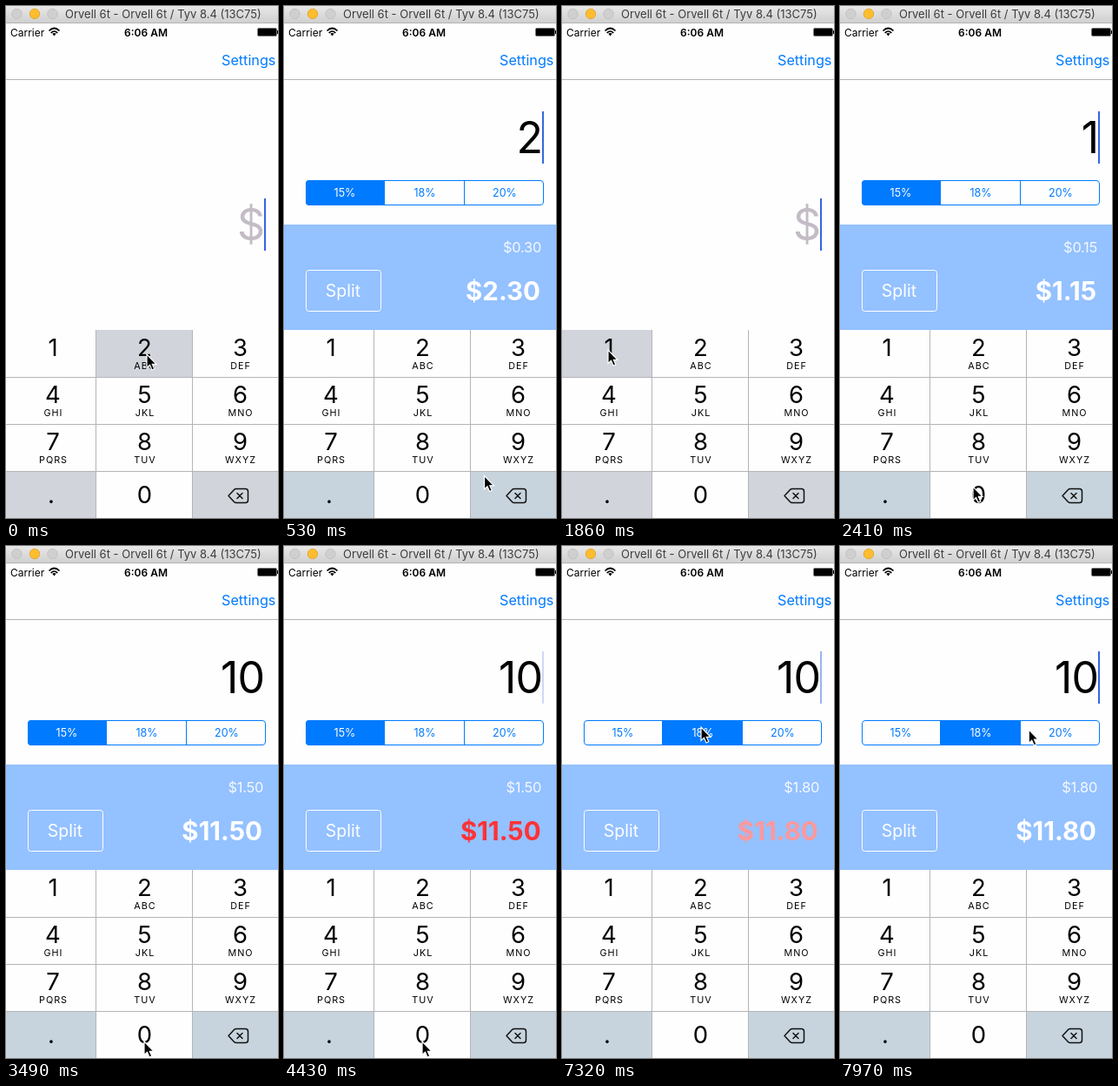
Animation of 313 by 588 pixels, one loop 8000 ms. Source, as an HTML page:

```html
<!DOCTYPE html>
<html lang="en">
<head>
<meta charset="utf-8">
<title>Tip calculator</title>
<style>
  html, body { margin: 0; width: 100%; height: 100%; overflow: hidden; background: #fff; }
  svg { display: block; width: 313px; height: 588px; font-family: Inter, Roboto, sans-serif; }
  .mid { text-anchor: middle; }
  .end { text-anchor: end; }
  .blue { fill: #007aff; }
  .line { stroke: #b4b5b8; }
  .digit { font-size: 27.5px; }
  .letters { font-size: 10.8px; letter-spacing: 1px; }
  .outline { fill: none; stroke: #007aff; }
</style>
</head>
<body>
<svg viewBox="0 0 313 588">
  <defs>
    <linearGradient id="chrome" x2="0" y2="1">
      <stop stop-color="#e9e8e9"/><stop offset="1" stop-color="#d1d0d1"/>
    </linearGradient>
    <clipPath id="segmentClip"><rect x="25" y="200" width="274" height="29" rx="4"/></clipPath>
  </defs>
  <rect width="313" height="588" fill="#fefefe"/>

  <g id="sheet">
    <g clip-path="url(#segmentClip)"><rect id="selected" y="200" height="29" class="blue"/></g>
    <rect x="25.5" y="200.5" width="273" height="28" rx="3.5" class="outline"/>
    <path d="M115.5 200V229M207.5 200V229" class="outline"/>
    <g id="segments" class="mid" font-size="12.5"></g>
    <rect y="251" width="313" height="337" fill="#94c1ff"/>
    <text id="tip" x="296" y="283" class="end" font-size="16.5" fill="#f4f8ff" letter-spacing="-.3"></text>
    <rect x="25.5" y="303.5" width="86" height="47" rx="3" fill="none" stroke="#fff"/>
    <text x="68" y="334" class="mid" font-size="19.5" fill="#fff">Split</text>
    <text id="total" x="295" y="337.5" class="end" font-size="29.5" font-weight="700"></text>
  </g>

  <g id="field">
    <text id="amount" x="297" y="169" class="end" font-size="50" letter-spacing="-1"></text>
    <rect id="caret" x="297" y="121" width="2" height="60" fill="#3566dc"/>
  </g>

  <g id="keyboard"></g>
  <g fill="none" stroke="#111" stroke-width="1.5" stroke-linejoin="round" stroke-linecap="round">
    <path d="M256 562.5L262.5 555.5Q263.5 554.5 265 554.5H275.500Q278.500 554.5 278.500 557.500V567.500Q278.500 570.500 275.500 570.500H265Q263.500 570.500 262.500 569.500Z"/>
    <path d="M266 559.500L272 565.500M272 559.500L266 565.500"/>
  </g>

  <path d="M0 84.500H313" class="line"/>
  <text x="248" y="68" class="blue" font-size="16.2">Settings</text>
  <text x="5" y="34.500" font-size="12">Carrier</text>
  <g fill="none" stroke="#000" stroke-width="1.700">
    <path d="M49.500 28.500Q55.500 22.500 61.500 28.500M51.700 31Q55.500 27 59.300 31"/>
    <path d="M53.300 31.800Q55.500 30 57.700 31.800L55.500 34.500Z" fill="#000" stroke="none"/>
  </g>
  <text x="161" y="34.500" class="mid" font-size="12" font-weight="600">6:06 AM</text>
  <rect x="289.500" y="25.500" width="22" height="9" rx="1.500" fill="#000" stroke="#777"/>
  <rect x="312" y="28" width="1" height="4"/>

  <rect width="313" height="19" fill="url(#chrome)"/>
  <path d="M0 19.500H313" stroke="#b5b4b5"/>
  <g fill="#d0cfd0" stroke="#bdbcbd" stroke-width=".8">
    <circle cx="12.500" cy="9" r="5.700"/>
    <circle cx="33" cy="9" r="5.700" fill="#fdbd2f" stroke="#dfa023"/>
    <circle cx="53.500" cy="9" r="5.700"/>
  </g>
  <text x="68" y="14" font-size="13" fill="#3c3c3c">Orvell 6t - Orvell 6t / Tyv 8.4 (13C75)</text>

  <path id="pointer" d="M0 0V15.500L3.500 12.300L6 18L8.800 16.800L6.300 11.300H11Z" stroke="#fff" stroke-width="1.200"/>
</svg>
<script>
const LOOP = 8000;
const $ = id => document.getElementById(id);
const clamp = v => Math.max(0, Math.min(1, v));
const ease = v => (v = clamp(v), v * v * (3 - 2 * v));
const mix = (a, b, k) => a + (b - a) * k;
const mixRgb = (a, b, k) => `rgb(${a.map((v, i) => Math.round(mix(v, b[i], k)))})`;

// Amount typed so far, by start time.
const edits = [[0, ''], [100, '2'], [670, ''], [1900, '1'], [2820, '10']];
const presses = [['2', 0, 100], ['back', 670, 810], ['1', 1730, 1900], ['0', 2550, 2820]];
const shakes = [3820, 7120];
const rateSwitch = 6120;
// Pointer stops: time, x, y.
const pointerPath = [
  [0, 162, 400], [110, 162, 400], [620, 245, 569], [1050, 245, 569], [1690, 53, 395],
  [1940, 53, 395], [2410, 153, 552], [2520, 159, 569], [4660, 159, 569], [4840, 146, 420],
  [5050, 160, 274], [5250, 160, 274], [5450, 160, 208], [7680, 160, 208], [7980, 219, 211]
];

const columns = [[0, 103, 54], [104, 110, 159.5], [215, 98, 269.5]];
const labels = ['', 'ABC', 'DEF', 'GHI', 'JKL', 'MNO', 'PQRS', 'TUV', 'WXYZ'];
const keyNames = [...'123456789.0', 'back'];
$('keyboard').innerHTML = keyNames.map((name, i) => {
  const [x, width, center] = columns[i % 3];
  const y = 372 + 54 * Math.floor(i / 3);
  const label = labels[i];
  const baseline = y + (i > 8 ? 37 : 30);
  return `<rect id="key-${name}" x="${x}" y="${y}" width="${width}" height="54"/>` +
    (name === 'back' ? '' : `<text x="${name === '.' ? 52 : center}" y="${baseline}" class="mid digit">${name}</text>`) +
    (label ? `<text x="${center + .5}" y="${y + 45}" class="mid letters">${label}</text>` : '');
}).join('') + '<path class="line" d="M0 426.5H313M0 480.5H313M0 534.5H313M103.5 372V588M214.5 372V588"/>';

$('segments').innerHTML = [15, 18, 20].map((rate, i) =>
  `<text x="${70 + 92 * i}" y="219">${rate}%</text>`).join('');

function pointerAt(t) {
  const next = Math.max(1, pointerPath.findIndex(stop => stop[0] > t));
  const [t0, x0, y0] = pointerPath[next - 1], [t1, x1, y1] = pointerPath[next];
  const k = (t - t0) / (t1 - t0);
  return [mix(x0, x1, k), mix(y0, y1, k)];
}

function caretOpacity(sinceEdit) {
  if (sinceEdit < 530) return 1;
  const phase = (sinceEdit - 530) % 975;
  return phase < 300 ? clamp(1 - phase / 140) : clamp((phase - 455) / 140);
}

function sheetOpenness(t) {
  if (t < 670) return ease((t - 100) / 300);
  return t < 1900 ? 1 - ease((t - 670) / 300) : ease((t - 1900) / 300);
}

function drawTotal(t, value) {
  const start = shakes.find(s => t >= s && t < s + 790);
  const age = start === undefined ? 0 : t - start;
  const shift = -10 * (1 - age / 800) * Math.sin(2 * Math.PI * age / 134.5);
  const red = clamp(Math.min(age / 400, (790 - age) / 100));
  $('total').textContent = '$' + value.toFixed(2);
  $('total').setAttribute('transform', `translate(${shift} 0)`);
  $('total').setAttribute('fill', mixRgb([255, 255, 255], [255, 50, 54], red));
}

function drawKeys(t, open) {
  const gray = mixRgb([209, 212, 219], [199, 212, 222], open);
  for (const name of keyNames) {
    const pressed = presses.some(([key, from, to]) => key === name && t >= from && t < to);
    const isGray = name === '.' || name === 'back';
    $('key-' + name).setAttribute('fill', isGray !== pressed ? gray : '#fefefe');
  }
}

function draw(t) {
  const [editTime, typed] = edits.filter(e => e[0] <= t).pop();
  const open = sheetOpenness(t);
  const choice = t < rateSwitch ? 0 : 1;
  const rate = [.15, .18][choice];
  const value = Number(typed);

  $('sheet').setAttribute('transform', `translate(0 ${420 * (1 - open)})`);
  $('selected').setAttribute('x', [25, 115][choice]);
  $('selected').setAttribute('width', [91, 93][choice]);
  [...$('segments').children].forEach((text, i) => text.setAttribute('fill', i === choice ? '#fff' : '#007aff'));
  $('tip').textContent = '$' + (value * rate).toFixed(2);
  drawTotal(t, value * (1 + rate));

  $('field').setAttribute('transform', `translate(0 ${100 * (1 - open)})`);
  $('amount').textContent = typed || '$';
  $('amount').setAttribute('fill', typed ? '#000' : '#c3bcc6');
  $('caret').setAttribute('opacity', caretOpacity(t - editTime));

  drawKeys(t, open);
  $('pointer').setAttribute('transform', `translate(${pointerAt(t)})`);
}

const startTime = performance.now();
function tick() {
  draw((performance.now() - startTime) % LOOP);
  requestAnimationFrame(tick);
}
tick();
</script>
</body>
</html>
```
